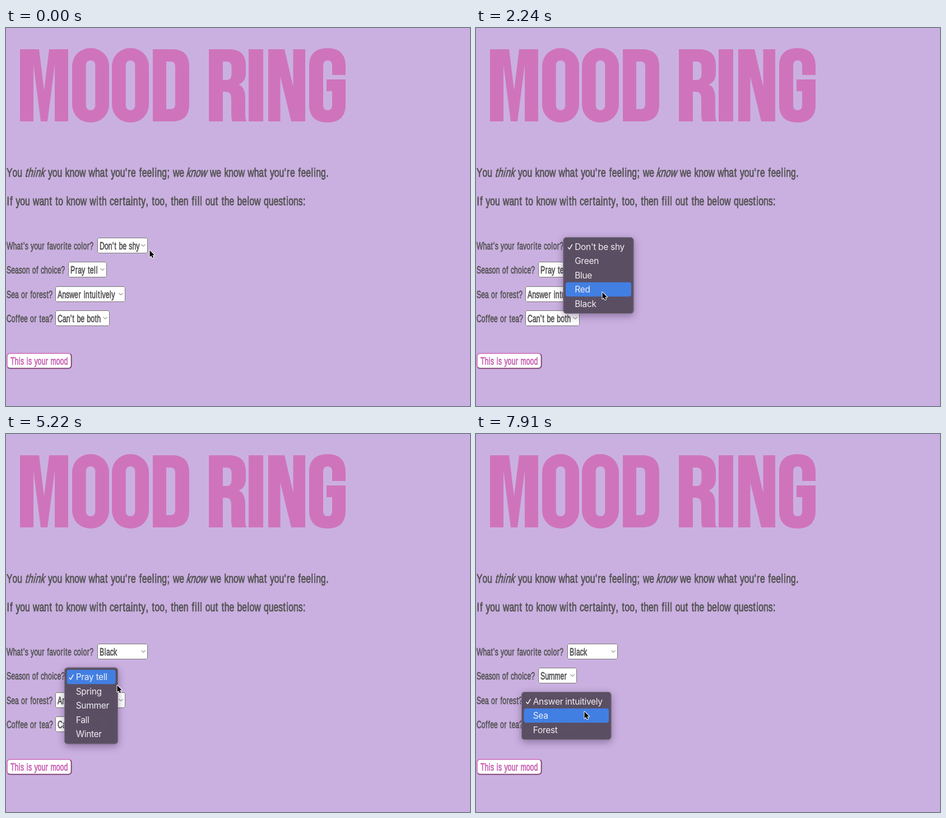
Recreate the animation shown at these times as an HTML page with a canvas. Size 828 by 676 pixels, loop 8 s.

```html
<!DOCTYPE html>
<html lang="en">
<head>
<meta charset="utf-8">
<title>Mood Ring</title>
<style>
html, body { margin: 0; width: 100%; height: 100%; overflow: hidden; background: #cab0e0; }
canvas { display: block; }
</style>
</head>
<body>
<canvas id="stage" width="828" height="676" role="img" aria-label="Mood Ring questionnaire"></canvas>
<script>
const ctx = document.getElementById('stage').getContext('2d');
const LOOP = 8000, TICK = 149.25;
const BG = '#cab0e0', INK = '#585659', PINK = '#cf74bc';

const selects = [
  { label: "What's your favorite color?", x: 163, w: 90, blank: "Don't be shy", pick: 'Black', from: 23, focusEnd: 30 },
  { label: 'Season of choice?', x: 111, w: 69, blank: 'Pray tell', pick: 'Summer', from: 44, focusEnd: 47 },
  { label: 'Sea or forest?', x: 88, w: 125, blank: 'Answer intuitively', from: 99 },
  { label: 'Coffee or tea?', x: 88, w: 97, blank: "Can't be both", from: 99 }
];
selects.forEach((s, i) => { s.y = Math.round(375 + 43.4 * i); s.h = 28; });

// Ticks: open = shown, fade = last tick before closing
const menus = [
  { x: 155.5, y: 374, w: 126, open: 8, fade: 22, items: ["Don't be shy", 'Green', 'Blue', 'Red', 'Black'] },
  { x: 104, y: 417.5, w: 96, open: 30, fade: 43, items: ['Pray tell', 'Spring', 'Summer', 'Fall', 'Winter'] },
  { x: 81, y: 461, w: 160.5, open: 47, fade: 99, items: ['Answer intuitively', 'Sea', 'Forest'] }
];

// Pointer path: tick, x, y
const path = [
  [0, 256, 397], [2, 243, 387], [4, 243, 387], [6, 242, 387], [10, 242, 387],
  [11, 256, 400], [12, 261, 421], [13, 252, 440], [15, 225, 472], [17, 213, 487],
  [24, 213, 487], [25, 200, 478], [26, 165, 450], [28, 131, 427], [31, 131, 427],
  [32, 140, 430], [34, 190, 444], [35, 198, 449], [38, 189, 471], [39, 186, 483],
  [42, 186, 484], [47, 192, 481], [50, 192, 481], [53, 193, 496]
];

function pointerAt(tick) {
  const i = path.findIndex(p => p[0] >= tick);
  if (i < 0) return path[path.length - 1].slice(1);
  if (i === 0) return path[0].slice(1);
  const a = path[i - 1], b = path[i], k = (tick - a[0]) / (b[0] - a[0]);
  return [a[1] + (b[1] - a[1]) * k, a[2] + (b[2] - a[2]) * k];
}

function box(x, y, w, h, r) {
  ctx.beginPath();
  ctx.roundRect(x, y, w, h, r);
}

// Condensed face: one width factor for all text, looser spaces and narrow letters
function narrow(str, x, y, size, color = INK, slant = 0) {
  const k = 0.7;
  ctx.font = `${size * 1.12}px "Liberation Sans", Arial, sans-serif`;
  ctx.fillStyle = ctx.strokeStyle = color;
  ctx.lineWidth = size * 0.05;
  ctx.lineJoin = 'round';
  for (const c of str) {
    const extra = c === ' ' ? 0.05 * size : 'tfilrI.,;:\''.includes(c) ? 0.06 * size : 0;
    ctx.save();
    ctx.transform(k, 0, -slant, 1, x + extra / 2, y);
    ctx.fillText(c, 0, 0);
    ctx.strokeText(c, 0, 0);
    ctx.restore();
    x += ctx.measureText(c).width * k + extra;
  }
}

const title = new Path2D(
  'M25 38H59L68 111L77 38H111V167H87V66L74 167H62L49 66V167H25Z' +
  'M262 38H296C317 38 327 48 327 69V136C327 157 317 167 296 167H262Z' +
  'M286 60V145H294Q302 145 302 136V69Q302 60 294 60Z' +
  'M362 38H397C419 38 428 48 428 68V78C428 91 424 98 415 101C425 105 427 115 427 128V150' +
  'C427 158 427 163 429.5 167H404C402.5 163 402 160 402 150V128C402 117 399 114 391 114H387V167H362Z' +
  'M387 60V93H393Q402.5 93 402.5 83V70Q402.5 60 394 60Z' +
  'M433 38H459V167H433Z' +
  'M468 38H497L512.5 105V38H534V167H509L489.5 87V167H468Z' +
  'M606 84H582V67Q582 58 574 58Q566 58 566 67V138Q566 147 574 147Q582 147 582 138V113H572V92H606V137' +
  'C606 158 595 169 574 169C552 169 541 158 541 137V68C541 47 552 36 574 36C595 36 606 47 606 68Z');
for (const x of [118, 189]) {
  title.roundRect(x, 36, 66, 133, 32);
  title.roundRect(x + 24.7, 58, 16.6, 89, 8);
}

function drawPage() {
  ctx.fillStyle = BG;
  ctx.fillRect(0, 0, 828, 676);
  ctx.fillStyle = PINK;
  ctx.fill(title, 'evenodd');
  narrow('You', 1, 266, 20);
  narrow('think', 33, 266, 20, INK, 0.25);
  narrow("you know what you're feeling; we", 75, 266, 20);
  narrow('know', 321, 266, 20, INK, 0.25);
  narrow("we know what you're feeling.", 364, 266, 20);
  narrow('If you want to know with certainty, too, then fill out the below questions:', 1, 317, 20);
}

function drawSelect(s, tick, px, py, hoverable) {
  const hover = hoverable && px > s.x && px < s.x + s.w && py > s.y && py < s.y + s.h;
  const focus = tick >= s.from && tick < s.focusEnd;
  narrow(s.label, 1, s.y + 21, 15.6);
  ctx.fillStyle = '#fff';
  box(s.x, s.y, s.w, s.h, 2.5);
  ctx.fill();
  ctx.lineWidth = focus ? 2 : 1;
  ctx.strokeStyle = focus ? '#1660cc' : hover ? '#4f4f4f' : '#767676';
  const inset = focus ? 1 : 0.5;
  box(s.x + inset, s.y + inset, s.w - 2 * inset, s.h - 2 * inset, 2.5);
  ctx.stroke();
  narrow(tick >= s.from ? s.pick : s.blank, s.x + 4, s.y + 21, 15.7);
  const cx = s.x + s.w - 8, cy = s.y + 14;
  ctx.strokeStyle = '#555';
  ctx.lineWidth = 1;
  ctx.beginPath();
  ctx.moveTo(cx - 3.5, cy - 2);
  ctx.lineTo(cx, cy + 1.5);
  ctx.lineTo(cx + 3.5, cy - 2);
  ctx.stroke();
}

function drawButton() {
  ctx.fillStyle = PINK;
  box(1, 581, 116.5, 28.5, 6);
  ctx.fill();
  ctx.save();
  ctx.beginPath();
  for (const [x, y] of [[118, 580], [118, 610], [0, 610], [9, 601], [109, 589]]) ctx.lineTo(x, y);
  ctx.clip();
  ctx.fillStyle = '#7b4370';
  box(1, 581, 116.5, 28.5, 6);
  ctx.fill();
  ctx.restore();
  ctx.fillStyle = '#fff';
  box(2.8, 582.8, 112.9, 24.9, 4.5);
  ctx.fill();
  narrow('This is your mood', 8, 602, 15.7, '#c862b4');
}

function drawMenu(m, tick, py) {
  if (tick < m.open || tick > m.fade) return;
  const h = m.items.length * 25.5 + 9.5;
  const row = Math.max(0, Math.min(m.items.length - 1, Math.floor((py - m.y - 6.5) / 25.5)));
  ctx.save();
  ctx.globalAlpha = tick === m.fade ? 0.45 : tick === m.fade - 1 ? 0.95 : 0.98;
  ctx.shadowColor = 'rgba(40,20,60,0.4)';
  ctx.shadowBlur = 14;
  ctx.shadowOffsetY = 4;
  ctx.fillStyle = '#594e62';
  box(m.x, m.y, m.w, h, 6);
  ctx.fill();
  ctx.shadowColor = 'transparent';
  ctx.strokeStyle = '#7d7484';
  ctx.lineWidth = 1;
  box(m.x + 0.5, m.y + 0.5, m.w - 1, h - 1, 5.5);
  ctx.stroke();
  ctx.fillStyle = '#4280e6';
  box(m.x + 4.5, m.y + 4.2 + row * 25.5, m.w - 9, 25.6, 4);
  ctx.fill();
  ctx.font = '15.5px Inter, Roboto, sans-serif';
  ctx.letterSpacing = '-0.3px';
  ctx.fillStyle = ctx.strokeStyle = '#f4f2f6';
  m.items.forEach((item, i) => ctx.fillText(item, m.x + 20.7, m.y + 22.7 + i * 25.5));
  ctx.lineWidth = 1.5;
  ctx.lineCap = ctx.lineJoin = 'round';
  ctx.beginPath();
  ctx.moveTo(m.x + 8.8, m.y + 18.5);
  ctx.lineTo(m.x + 11.3, m.y + 21.5);
  ctx.lineTo(m.x + 16, m.y + 13.5);
  ctx.stroke();
  ctx.restore();
}

const arrow = new Path2D('M0 0V12L2.7 9.5L4.5 13.7L6.5 12.8L4.7 8.7H8.4Z');

function drawPointer(x, y) {
  ctx.save();
  ctx.translate(x + 0.5, y + 0.5);
  ctx.strokeStyle = '#fff';
  ctx.lineWidth = 2;
  ctx.lineJoin = 'round';
  ctx.stroke(arrow);
  ctx.fillStyle = '#000';
  ctx.fill(arrow);
  ctx.restore();
}

function draw(t) {
  const tick = Math.floor((t + 8) / TICK);
  const [px, py] = pointerAt(tick);
  const hoverable = !menus.some(m => tick >= m.open && tick <= m.fade);
  drawPage();
  selects.forEach(s => drawSelect(s, tick, px, py, hoverable));
  drawButton();
  menus.forEach(m => drawMenu(m, tick, py));
  drawPointer(px, py);
}

const start = performance.now();
function loop() {
  draw((performance.now() - start) % LOOP);
  requestAnimationFrame(loop);
}
loop();
</script>
</body>
</html>
```
